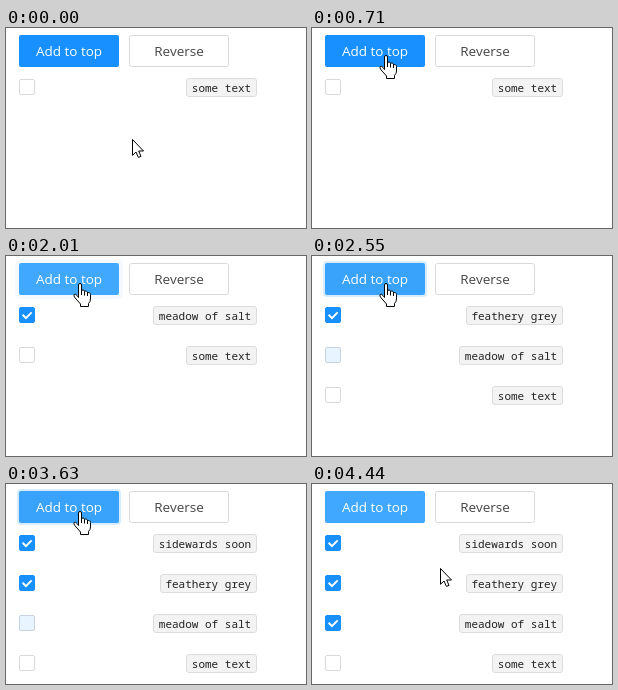
Animation, 300 px wide and 200 px high, one loop 4.47 s. Source, as an HTML page:

```html
<!DOCTYPE html>
<html lang="en">
<head>
<meta charset="utf-8">
<title>Add to top</title>
<style>
html, body { margin: 0; width: 100%; height: 100%; overflow: hidden; background: #fff; }
svg { display: block; width: 300px; height: 200px; }
.label { font: 13.5px "Open Sans", "Noto Sans", sans-serif; text-anchor: middle; }
.code { font: 11px "Noto Sans Mono", "DejaVu Sans Mono", monospace; fill: #222; }
.line { fill: #fff; stroke: #d9d9d9; }
.tick { fill: none; stroke: #fff; stroke-width: 2; }
.cursor { fill: #fff; stroke: #000; stroke-linejoin: round; }
</style>
</head>
<body>
<svg viewBox="0 0 300 200">
  <rect id="wave" fill="#1890ff"/>
  <rect id="add" x="13" y="7" width="100" height="32" rx="2"/>
  <text class="label" x="63" y="28" fill="#fff">Add to top</text>
  <rect class="line" x="123.5" y="7.5" width="99" height="31" rx="2"/>
  <text class="label" x="173" y="28" fill="#454545">Reverse</text>
  <g id="rows"></g>
  <circle id="press" cx="73" cy="27" r="12" fill="#ffdc00" fill-opacity=".55"/>
  <path id="arrow" class="cursor" d="M.5 .5V16.3L4 13L6.4 18.4L9 17.4L6.7 12H11.5Z"/>
  <g id="hand" class="cursor">
    <path d="M5.5 14.5V2Q5.5 .5 7 .5Q8.5 .5 8.5 2V8Q8.7 6.8 10.2 7Q11.6 7.2 11.6 8.8Q12.3 7.8 13.5 8.2Q14.6 8.6 14.6 10Q15.5 9.2 16.6 9.8Q17.5 10.3 17.5 11.6V16Q17.5 18.5 15.5 20.5V23.5H7.5V21L2 14.8Q.3 12.5 1.2 11.6Q2.4 10.6 4 12.4Z"/>
    <path fill="none" d="M8.5 8V12M11.5 9V12.5M14.5 10V13"/>
  </g>
</svg>
<script>
const LOOP = 4470;
const LABELS = ["some text", "meadow of salt", "feathery grey", "sidewards soon"];
// press: marker appears; add: row is inserted; rest: last moment the effects move
const CLICKS = [
  { press: 1530, add: 1660, rest: 2010 },
  { press: 2350, add: 2520, rest: 2940 },
  { press: 3480, add: 3600, rest: 3930, clear: true }
];
const HOVER = [64, 169, 255], IDLE = [24, 144, 255], ACTIVE = [9, 109, 217];

const $ = id => document.getElementById(id);
const clamp = v => Math.min(1, Math.max(0, v));
const mix = (a, b, p) => a + (b - a) * p;
const rgb = (a, b, p) => `rgb(${a.map((v, i) => Math.round(mix(v, b[i], p)))})`;
const set = (el, attrs) => { for (const k in attrs) el.setAttribute(k, attrs[k]); };

function bezier(x1, y1, x2, y2) {
  const at = (a, b, s) => 3 * (1 - s) ** 2 * s * a + 3 * (1 - s) * s * s * b + s ** 3;
  return x => {
    if (x <= 0) return 0;
    if (x >= 1) return 1;
    let lo = 0, hi = 1;
    for (let i = 0; i < 24; i++) {
      const s = (lo + hi) / 2;
      if (at(x1, x2, s) < x) lo = s; else hi = s;
    }
    return at(y1, y2, lo);
  };
}
const ease = bezier(.25, .1, .25, 1);
const waveEase = bezier(.08, .82, .17, 1);
const tickEase = bezier(.12, .4, .29, 1.46);

function make(parent, tag, attrs) {
  const el = document.createElementNS("http://www.w3.org/2000/svg", tag);
  set(el, attrs);
  return parent.appendChild(el);
}

const rows = LABELS.map((_, i) => {
  const g = make($("rows"), "g", { transform: `translate(0 ${50 + 40 * i})` });
  return {
    g,
    box: make(g, "rect", { x: 13.5, y: 1.5, width: 15, height: 15, rx: 1.5 }),
    tick: make(g, "path", { class: "tick", d: "M-4.5 .5L-1.2 3.8L4.5 -1.9" }),
    tag: make(g, "rect", { y: .5, height: 18, rx: 2.5, fill: "#f3f3f3", stroke: "#dcdcdc" }),
    text: make(g, "text", { class: "code", y: 14 })
  };
});

function drawRows(t) {
  const count = CLICKS.filter(c => t >= c.add).length;
  rows.forEach(({ g, box, tick, tag, text }, i) => {
    g.style.display = i <= count ? "" : "none";
    if (i > count) return;
    const label = LABELS[count - i];
    const width = label.length * 6.6 + 11.6;
    set(tag, { x: 251.5 - Math.round(width), width: Math.round(width) - 1 });
    text.textContent = label;
    set(text, { x: 251 - width + 5.8 });

    // Boxes keep their place, so the lowest checked one is the one that fades in.
    const age = i < count ? t - CLICKS[i].add : 0;
    const fill = ease(clamp(age / 300));
    const grow = tickEase(clamp((age - 100) / 200));
    set(box, {
      fill: rgb([255, 255, 255], IDLE, fill),
      stroke: rgb([217, 217, 217], IDLE, fill)
    });
    set(tick, {
      transform: `translate(21.15 8.3) scale(${grow})`,
      opacity: clamp(grow)
    });
  });
}

function drawButton(t) {
  const click = CLICKS.filter(c => t >= c.add).pop();
  let color = rgb(t < CLICKS[0].press ? IDLE : HOVER, HOVER, 0);
  let spread = 0, alpha = 0;
  if (click) {
    const age = Math.min(t, click.rest) - click.add;
    const dip = age < 30 ? .12 * age / 30 : .12 * (1 - ease(clamp((age - 30) / 270)));
    color = rgb(HOVER, ACTIVE, dip);
    spread = 4 * waveEase(age / 400);
    alpha = click.clear && t >= click.rest ? 0 : .2 * (1 - waveEase(age / 2000));
  }
  set($("add"), { fill: color });
  set($("wave"), {
    x: 13 - spread, y: 7 - spread,
    width: 100 + 2 * spread, height: 32 + 2 * spread,
    rx: 2 + spread, opacity: alpha
  });
}

function pointer(t) {
  if (t < 710) {
    const p = 1 - (1 - clamp((t - 10) / 530)) ** 2.4;
    return [mix(126, 72, p), mix(111, 28, p)];
  }
  const p = clamp((t - 4345) / 95);
  return [mix(72, 128, p), mix(27, 84, p)];
}

function drawPointer(t) {
  const [x, y] = pointer(t).map(Math.round);
  const over = y < 39;
  $("hand").style.display = over ? "" : "none";
  $("arrow").style.display = over ? "none" : "";
  set($("hand"), { transform: `translate(${x - 5} ${y})` });
  set($("arrow"), { transform: `translate(${x} ${y})` });
  $("press").style.display = CLICKS.some(c => t >= c.press && t < c.add) ? "" : "none";
}

const start = performance.now();
function frame() {
  const t = (performance.now() - start) % LOOP;
  drawRows(t);
  drawButton(t);
  drawPointer(t);
  requestAnimationFrame(frame);
}
frame();
</script>
</body>
</html>
```
